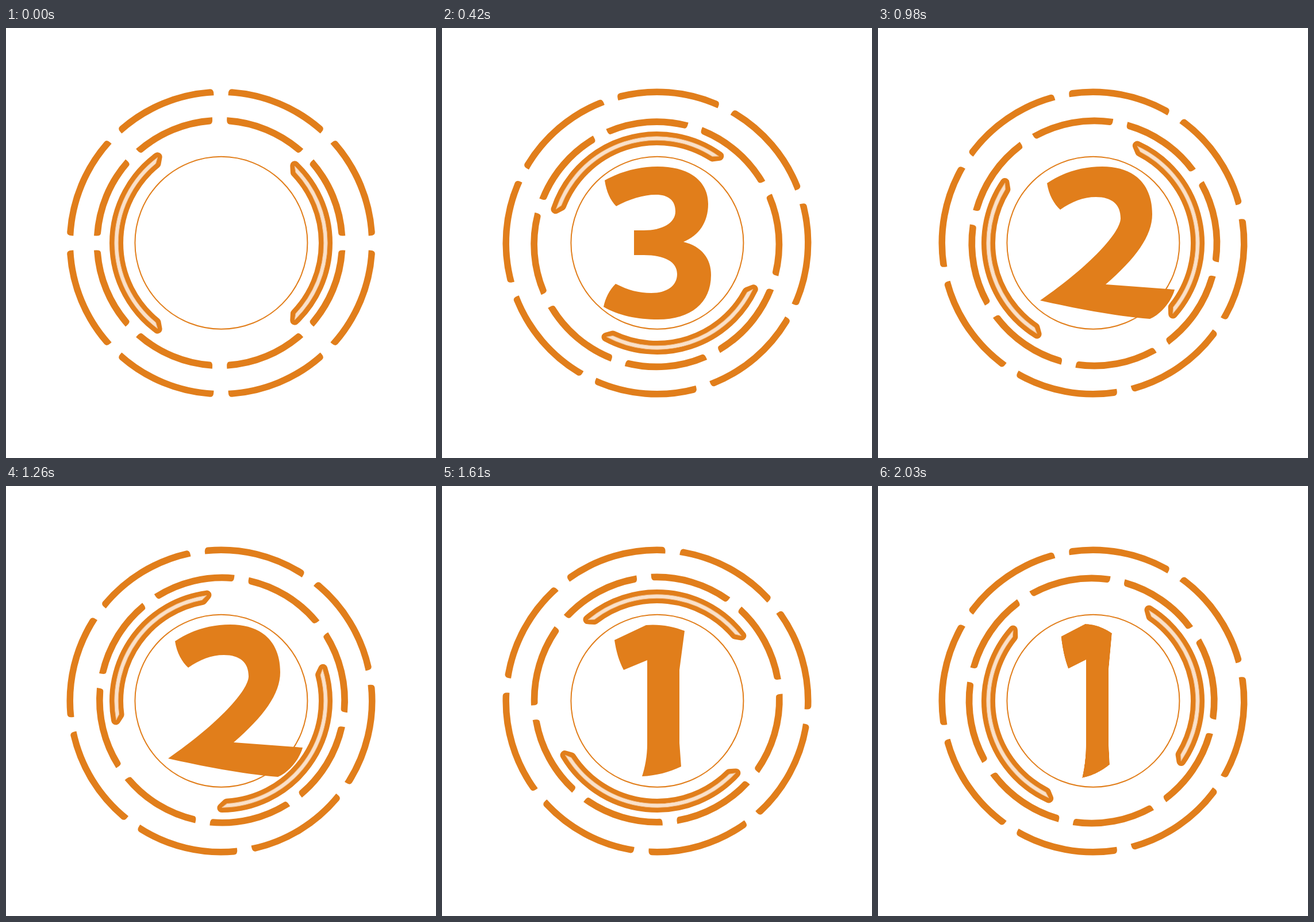
An HTML page that plays this animation: 748x748 px, repeating every 2100 ms.

```html
<!DOCTYPE html>
<html lang="en">
<head>
<meta charset="utf-8">
<title>Countdown</title>
<style>
  html, body { margin: 0; width: 100%; height: 100%; overflow: hidden; background: #fff; }
  svg { position: absolute; left: 0; top: 0; width: 748px; height: 748px; }
  path { fill: #e17e1b; }
  .rim { fill: none; stroke: #e17e1b; stroke-width: 2; }
  .tube { stroke: #e17e1b; stroke-width: 16; stroke-linejoin: round; }
  .core { fill: #fae1ca; stroke: #f0bd8b; stroke-width: 1; stroke-linejoin: round; }
  #digits { transform-origin: 374px 374px; }
</style>
</head>
<body>
<svg viewBox="0 0 748 748">
  <circle class="rim" cx="374.4" cy="373.8" r="150"/>
  <g id="outer"></g>
  <g id="inner"></g>
</svg>
<svg id="digits" viewBox="0 0 748 748">
  <path d="M283 265C310 250 342 241 375 241C430 241 463 266 463 306C463 338 447 361 420 372C452 380 468 401 468 430C468 478 433 507 376 507C340 507 306 500 281 485C284 470 291 456 302 445C324 456 342 461 364 461C392 461 409 448 409 428C409 407 388 395 351 395H334V352H351C384 352 406 339 406 319C406 300 394 290 372 290C350 290 325 298 303 310C293 300 286 285 283 265Z"/>
  <path d="M294 270C322 251 355 241 390 241C445 241 477 271 477 324C477 362 448 401 396 446L516 455C512 472 494 497 473 506C410 501 340 487 282 474C370 413 422 355 422 331C422 307 407 294 379 294C357 294 337 302 317 316C306 306 297 290 294 270Z"/>
  <path d="M300 268L355 242C378 240 401 244 422 252L413 320V447L416 488C395 498 372 504 348 505C353 490 357 470 357 449V303L316 320C308 305 303 288 300 268Z"/>
</svg>
<script>
const STEP = 70, STEPS = 30, TURN = 360 / STEPS, PER_DIGIT = 10;
const $ = id => document.getElementById(id);
const outer = $('outer'), inner = $('inner'), digits = $('digits');

// Bearing in degrees, clockwise from the top, around the local origin.
function at(r, deg) {
  const a = deg * Math.PI / 180;
  return `${(r * Math.sin(a)).toFixed(2)} ${(-r * Math.cos(a)).toFixed(2)}`;
}

function add(group, d, cls = '') {
  const p = document.createElementNS('http://www.w3.org/2000/svg', 'path');
  p.setAttribute('d', d);
  p.setAttribute('class', cls);
  group.append(p);
}

// Arc segment with sharp corners at radius s and soft corners at radius b.
function dash(s, b, from, to) {
  const mid = s + (b - s) * 0.3, d = 1.3;
  return `M${at(s, from)}L${at(mid, from)}Q${at(b, from)} ${at(b, from + d)}` +
    `A${b} ${b} 0 0 1 ${at(b, to - d)}Q${at(b, to)} ${at(mid, to)}` +
    `L${at(s, to)}A${s} ${s} 0 0 0 ${at(s, from)}Z`;
}

function ring(group, s, b, gap) {
  for (let a = 0; a < 360; a += 45) add(group, dash(s, b, a + gap, a + 45 - gap));
}

function tube(mid, half) {
  const shape = (r0, r1, h) => `M${at(r1, mid - h)}A${r1} ${r1} 0 0 1 ${at(r1, mid + h)}` +
    `L${at(r0, mid + h - 2.8)}A${r0} ${r0} 0 0 0 ${at(r0, mid - h + 2.8)}Z`;
  add(outer, shape(178, 186, half), 'tube');
  add(outer, shape(178.8, 185.2, half - 0.2), 'core');
}

ring(outer, 257, 268.5, 2.8);
ring(inner, 219, 207.3, 3.35);
tube(-90, 53.6);
tube(90, 46.4);

function draw(time) {
  const n = Math.floor(time / STEP) % STEPS;
  outer.setAttribute('transform', `translate(374 374) rotate(${n * TURN})`);
  // The inner ring sits slightly off its pivot, so it wobbles.
  inner.setAttribute('transform', `translate(374 374) rotate(${-n * TURN}) translate(-2.4 0)`);

  // Each digit swings in, holds, then swings out edge-on.
  const k = n % PER_DIGIT, shown = Math.floor(n / PER_DIGIT);
  const swing = k < 2 ? -90 + 45 * k : k === PER_DIGIT - 1 ? 45 : 0;
  digits.style.visibility = k ? 'visible' : 'hidden';
  digits.style.transform = swing ? `perspective(950px) rotateY(${swing}deg)` : 'none';
  [...digits.children].forEach((p, i) => p.style.display = i === shown ? '' : 'none');
}

function tick() {
  draw(performance.now());
  requestAnimationFrame(tick);
}
tick();
</script>
</body>
</html>
```
